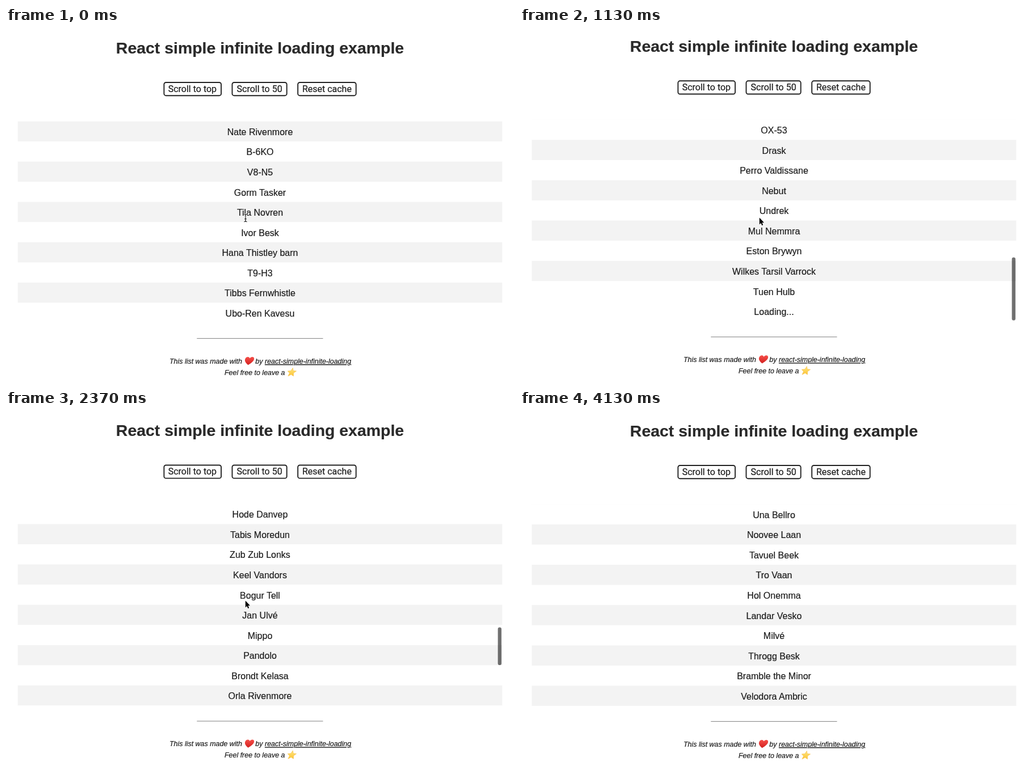
Recreate the animation shown at these times as an HTML page. Size 895x626 px, loop 4360 ms.

```html
<!DOCTYPE html>
<html lang="en">
<head>
<meta charset="utf-8">
<title>Infinite loading example</title>
<style>
  html, body { margin: 0; width: 100%; height: 100%; overflow: hidden; background: #fff; }
  #stage { display: block; width: 895px; height: 626px; }
  text { font: 16px "Liberation Sans", Arial, sans-serif; fill: #1c1c1c; stroke: #1c1c1c; stroke-width: .2px; }
  .mid { text-anchor: middle; }
  .title { font-size: 28.44px; font-weight: bold; fill: #2a2a2a; stroke: #2a2a2a; }
  .button text { font-family: Roboto, sans-serif; }
  .button rect { fill: #fff; stroke: #222; stroke-width: 1.9; }
  .foot text { font-size: 12.44px; font-style: italic; }
  .link { text-decoration: underline; }
  .emoji { transform: skewX(-14deg); transform-box: fill-box; transform-origin: center; }
  #thumb { fill: rgba(0, 0, 0, .56); }
  .cursor { stroke-linejoin: round; }
</style>
</head>
<body>
<svg id="stage" viewBox="0 0 895 626">
  <defs>
    <linearGradient id="red" x1="0" y1="0" x2="0" y2="1">
      <stop offset="0" stop-color="#f5504a"/><stop offset="1" stop-color="#d3201f"/>
    </linearGradient>
    <linearGradient id="gold" x1="0" y1="0" x2="0" y2="1">
      <stop offset="0" stop-color="#ffe680"/><stop offset="1" stop-color="#fcc536"/>
    </linearGradient>
    <path id="beamShape" d="M419.4 328.3Q421.6 328.3 422 330Q422.4 328.3 424.6 328.3M422 330V340M419.4 341.7Q421.6 341.7 422 340Q422.4 341.7 424.6 341.7M420.4 336.6H423.6"/>
  </defs>
  <g id="page">
    <text class="title mid" x="447.5" y="44.5">React simple infinite loading example</text>
    <g class="button">
      <rect x="278.4" y="96" width="100.7" height="23.2" rx="3.5"/>
      <text class="mid" x="328.4" y="113">Scroll to top</text>
    </g>
    <g class="button">
      <rect x="398.5" y="96" width="96.2" height="23.2" rx="3.5"/>
      <text class="mid" x="446.6" y="113">Scroll to 50</text>
    </g>
    <g class="button">
      <rect x="514.2" y="96" width="102.5" height="23.2" rx="3.5"/>
      <text class="mid" x="565.4" y="113">Reset cache</text>
    </g>
    <svg x="20.4" y="164.44" width="854.2" height="355.56" overflow="hidden"><g id="rows"></g></svg>
    <rect id="thumb" x="866.6" width="6.3" rx="3.15"/>
    <rect x="336.3" y="546.9" width="222.2" height="1.1" fill="#8c8c8c"/>
    <g class="foot">
      <text x="288" y="592">This list was made with</text>
      <path class="emoji" d="M428.3 594.2C424 591.2 420.4 588 420.4 584.2C420.4 581.6 422.2 580 424.4 580C426.2 580 427.6 581 428.3 582.6C429 581 430.4 580 432.2 580C434.4 580 436.3 581.6 436.3 584.2C436.3 588 432.6 591.2 428.3 594.2Z" fill="url(#red)"/>
      <text x="439.3" y="592">by</text>
      <text class="link" x="456" y="592">react-simple-infinite-loading</text>
      <text x="385" y="612">Feel free to leave a</text>
      <path id="star" class="emoji" fill="url(#gold)" stroke="#f6bd45" stroke-width=".6" stroke-linejoin="round"/>
    </g>
  </g>
  <g id="beam" class="cursor" fill="none">
    <use href="#beamShape" stroke="#fff" stroke-width="2.6"/>
    <use href="#beamShape" stroke="#111" stroke-width="1.1"/>
  </g>
  <path id="arrow" class="cursor" d="M421.8 334.6v12l2.7-2.5l1.8 4.1l1.9-.9l-1.7-4h3.6z" fill="#000" stroke="#fff" stroke-width="1.4" paint-order="stroke"/>
</svg>
<script>
const LOOP = 4360, ROW = 320 / 9, VISIBLE = 10, TRACK = 352;
const $ = id => document.getElementById(id);

const names = `Nate Rivenmore,B-6KO,V8-N5,Gorm Tasker,Tila Novren,Ivor Besk,Hana Thistley barn,T9-H3,
Tibbs Fernwhistle,Ubo-Ren Kavesu,Edrin Rivenmore,Halbert Dorvik,Grumbolla,Jon Veda,Plindo,Morba Telisandic Ruve,
Pledge Morinel,Bax Lumo Dorvane,Vema,Solvadine,Kelo Dunn,OX-53,Drask,Perro Valdissane,Nebut,Undrek,Mul Nemmra,
Eston Brywyn,Wilkes Tarsil Varrock,Tuen Hulb,Dao-Bel Tarr,Hode Danvep,Tabis Moredun,Zub Zub Lonks,Keel Vandors,
Bogur Tell,Jan Ulvé,Mippo,Pandolo,Brondt Kelasa,Orla Rivenmore,Gorm Dreld,Lud Marenso,Isra Telumo,Pok Yarn,
Rendavo,Sim Holdaveros,Pell Ordan,Jo-Ema-Tarlo,Bal Runto,Oord Vash,Una Bellro,Noovee Laan,Tavuel Beek,Tro Vaan,
Hol Onemma,Landar Vesko,Milvé,Throgg Besk,Bramble the Minor,Velodora Ambric`.split(",").map(s => s.trim());

// [time in ms, value]; scroll is counted in rows, bounce in pixels
const scrollKeys = [[0, 0], [100, 1.1], [300, 6.2], [530, 11.5], [770, 16.08], [1030, 21], [1430, 21],
  [1530, 21.8], [1700, 25.3], [1900, 29], [2040, 31], [2430, 31], [2530, 31.8], [2730, 36.08],
  [2950, 41.9], [3170, 48.3], [3230, 51]];
const bounceKeys = [[1030, 0], [1070, 3], [1130, 2.7], [1230, 1.5], [1400, 0], [2030, 0], [2070, 2.7],
  [2130, 5], [2170, 4], [2300, 1.2], [2430, 0]];
const loadKeys = [[1330, 30], [1430, 40], [2230, 40], [2330, 50], [2400, 50], [2500, 60],
  [3370, 60], [3500, 70], [3600, 70], [3730, 80]];
const fadeKeys = [[3970, 1], [4130, 0]];

function valueAt(keys, t) {
  const i = keys.findIndex(k => k[0] >= t);
  if (i < 0) return keys[keys.length - 1][1];
  if (i === 0) return keys[0][1];
  const [t0, a] = keys[i - 1], [t1, b] = keys[i];
  return a + (b - a) * (t - t0) / (t1 - t0);
}

function add(parent, tag, attrs) {
  const el = document.createElementNS("http://www.w3.org/2000/svg", tag);
  for (const k in attrs) el.setAttribute(k, attrs[k]);
  return parent.appendChild(el);
}

const rows = names.map((name, i) => {
  const bar = i % 2 ? null : add($("rows"), "rect", { y: i * ROW, width: 854.2, height: ROW, fill: "#f3f3f3" });
  const label = add($("rows"), "text", { class: "mid", x: 427.1, y: i * ROW + 24.4 });
  label.textContent = name;
  return { name, bar, label };
});

$("star").setAttribute("d", "M" + Array.from({ length: 10 }, (_, i) => {
  const a = i * Math.PI / 5 - Math.PI / 2, r = i % 2 ? 3.7 : 8;
  return (503.5 + r * Math.cos(a)).toFixed(2) + " " + (607.4 + r * Math.sin(a)).toFixed(2);
}).join("L") + "Z");

let loadingRow = -1;
function setLoading(index) {
  if (index === loadingRow) return;
  loadingRow = index;
  rows.forEach((row, i) => {
    const waiting = i >= index;
    row.label.textContent = waiting ? (i === index ? "Loading..." : "") : row.name;
    if (row.bar) row.bar.style.display = waiting ? "none" : "";
  });
}

function draw(time) {
  const t = Math.round(Math.floor((time + 3.4) * .03) * 10 / 3) * 10;
  const scroll = valueAt(scrollKeys, t);
  const loaded = valueAt(loadKeys, t);
  setLoading(Math.ceil(loaded / 10) * 10);
  $("page").setAttribute("transform", `translate(0 ${-valueAt(bounceKeys, t)})`);
  $("rows").setAttribute("transform", `translate(0 ${-scroll * ROW})`);

  const count = loaded + 1;
  const size = TRACK * VISIBLE / count - 2.5;
  $("thumb").setAttribute("height", size);
  $("thumb").setAttribute("y", 166.3 + scroll / (count - VISIBLE) * (TRACK - size));
  $("thumb").style.opacity = t < 30 ? 0 : valueAt(fadeKeys, t);

  $("beam").style.display = t < 100 ? "" : "none";
  $("arrow").style.display = t >= 100 && t < 4000 ? "" : "none";
}

const start = performance.now();
function tick() {
  draw((performance.now() - start) % LOOP);
  requestAnimationFrame(tick);
}
tick();
</script>
</body>
</html>
```
